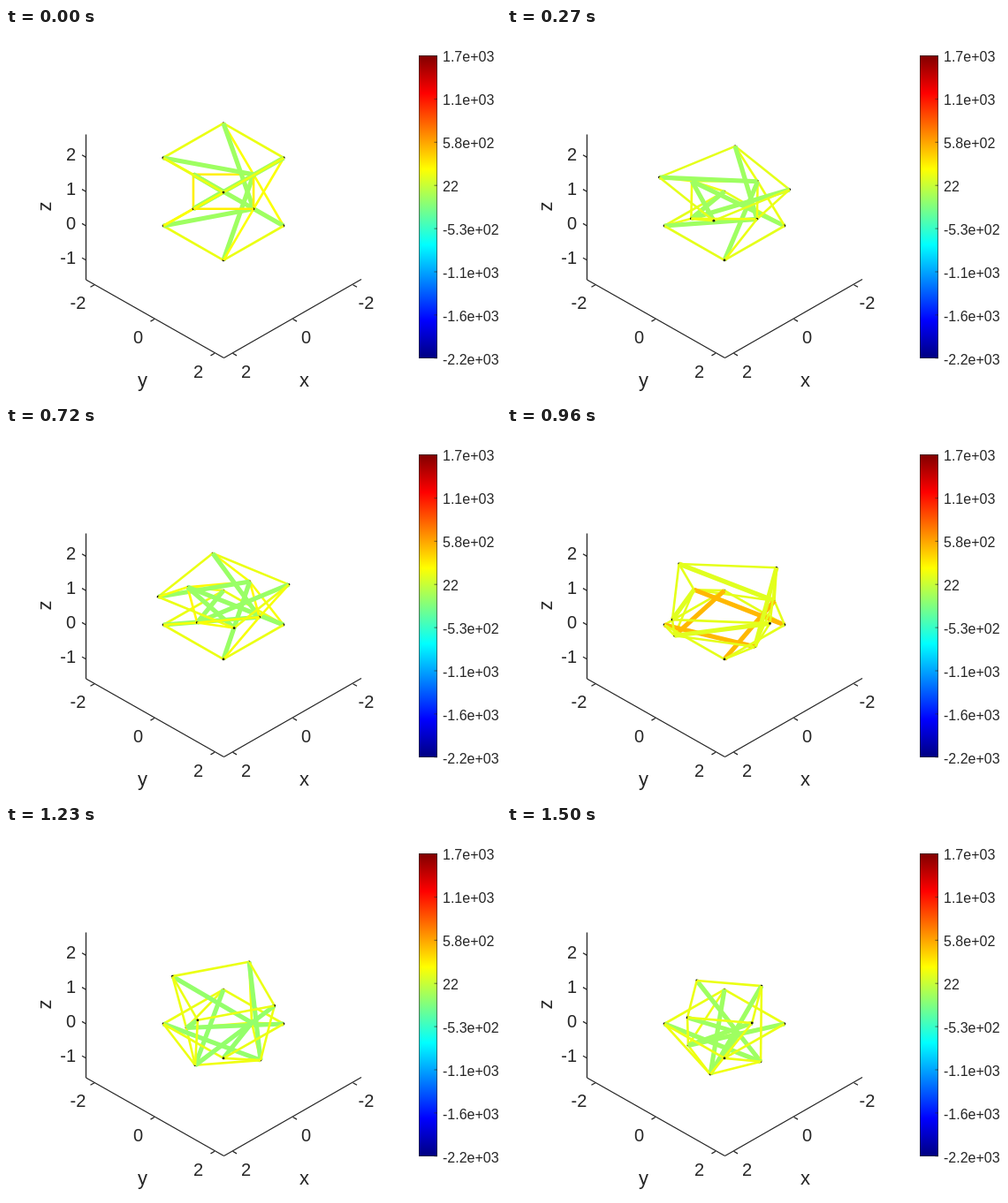
Write an HTML page with a canvas that moves like this. It is 560x420 px and loops after 1530 ms.

```html
<!DOCTYPE html>
<html lang="en">
<head>
<meta charset="utf-8">
<title>Tensegrity tower</title>
<style>
html, body { margin: 0; width: 100%; height: 100%; overflow: hidden; background: #fff; }
canvas { display: block; width: 560px; height: 420px; }
</style>
</head>
<body>
<canvas id="stage" width="560" height="420"></canvas>
<script>
const ctx = document.getElementById('stage').getContext('2d');
const LOOP = 1530, STEP = 30;
const CX = 246, BASE_Y = 224, BASE_R = 68;
const TILT = 0.572, RISE = 0.807;
const INK = '#262626', FONT = '"Liberation Sans", Arial, sans-serif';

// time, top turn, mid turn, top y, mid y, lower bar length, upper bar length,
// then colour levels: lower bars, upper bars, cables, middle ring
const KEYS = [
  [0, 0, 0, 147, 185.3, 117.8, 117.8, .53, .53, .605, .64],
  [270, 9.3, .6, 176, 194.8, 117.1, 116.4, .53, .53, .6, .61],
  [480, -13.2, -8.6, 183.5, 200.5, 116.9, 117, .525, .525, .605, .64],
  [720, -9.3, -8.8, 185.3, 198.2, 117.1, 117.4, .525, .525, .605, .63],
  [960, 48.9, 13.6, 188.7, 216.5, 117.4, 115.9, .695, .595, .6, .6],
  [1080, 46, 17, 187.5, 235.5, 117.8, 116.5, .6, .57, .6, .6],
  [1230, 26.8, -7.7, 186.8, 246.8, 118, 117.2, .52, .52, .605, .61],
  [1500, -36.7, -23.7, 199, 257.6, 117.8, 117.7, .53, .53, .605, .61]
];

const slope = (i, c) => {
  const a = KEYS[Math.max(i - 1, 0)], b = KEYS[Math.min(i + 1, KEYS.length - 1)];
  return (b[c] - a[c]) / (b[0] - a[0]);
};

// Cubic motion for the pose, linear for the colour levels
function sample(time) {
  let i = 0;
  while (i < KEYS.length - 2 && time >= KEYS[i + 1][0]) i++;
  const a = KEYS[i], b = KEYS[i + 1], span = b[0] - a[0], u = (time - a[0]) / span;
  return a.map((p, c) => {
    const d = b[c] - p;
    if (c > 4) return p + d * u;
    const m = slope(i, c) * span, n = slope(i + 1, c) * span;
    return p + m * u + (3 * d - 2 * m - n) * u * u + (m + n - 2 * d) * u * u * u;
  });
}

const rad = deg => deg * Math.PI / 180;

// Outer radius that keeps a rigid bar of the given length
function reach(r, deg, dy, len) {
  const c = r * Math.cos(rad(deg)), z = dy / RISE;
  return c + Math.sqrt(Math.max(0, c * c - r * r - z * z + len * len));
}

function ring(r, start, y) {
  return [0, 1, 2, 3].map(k => {
    const a = rad(start + 90 * k), v = r * Math.sin(a);
    return { x: CX + r * Math.cos(a), y: y + TILT * v,
             depth: v * RISE + (BASE_Y - y) / RISE * TILT };
  });
}

function jet(v) {
  const ch = mid => Math.round(255 * Math.min(1, Math.max(0, 1.5 - Math.abs(4 * v - mid))));
  return `rgb(${ch(3)},${ch(2)},${ch(1)})`;
}

function line(x1, y1, x2, y2, color = INK, width = 1.3) {
  ctx.strokeStyle = color;
  ctx.lineWidth = width;
  ctx.beginPath();
  ctx.moveTo(x1, y1);
  ctx.lineTo(x2, y2);
  ctx.stroke();
}

function label(text, x, y, size = 20, align = 'center') {
  ctx.fillStyle = INK;
  ctx.font = `${size}px ${FONT}`;
  ctx.textAlign = align;
  ctx.textBaseline = 'alphabetic';
  ctx.fillText(text, x, y + size * 0.36);
}

function drawAxes() {
  line(90.5, 120.5, 90.5, 285);
  line(90.5, 285, 246.5, 373.5);
  line(246.5, 373.5, 402, 284.5);
  for (const z of [-1, 0, 1, 2]) {
    const y = BASE_Y - 38.8 * z;
    line(90.5, y, 86, y - 2.6);
    label(z, 79, y - 3.5, 20, 'right');
  }
  for (const n of [-2, 0, 2]) {
    const yx = 168 + 34 * n, xx = 324.5 - 34 * n, y = 329.5 + 19.4 * n;
    line(yx, y, yx - 4.5, y + 2.6);
    line(xx, y, xx + 4.5, y + 2.6);
    label(n, yx - 18.5, y + 20);
    label(n, xx + 15, y + 20);
  }
  label('x', 337.5, 398, 22);
  label('y', 154.5, 398, 22);
  ctx.save();
  ctx.translate(43, 202);
  ctx.rotate(-Math.PI / 2);
  label('z', 0, 0, 22);
  ctx.restore();
}

function drawColorbar() {
  const fill = ctx.createLinearGradient(0, 374, 0, 31);
  for (const v of [0, .125, .375, .625, .875, 1]) fill.addColorStop(v, jet(v));
  ctx.fillStyle = fill;
  ctx.fillRect(467, 31, 21, 343);
  ctx.strokeStyle = INK;
  ctx.lineWidth = 0.6;
  ctx.strokeRect(467.5, 31.5, 20, 342);
  ['1.7e+03', '1.1e+03', '5.8e+02', '22', '-5.3e+02', '-1.1e+03', '-1.6e+03', '-2.2e+03']
    .forEach((text, i) => {
      const y = 31.5 + i * 48.9;
      line(484.5, y, 488, y, INK, 0.7);
      label(text, 494, y + 1, 16, 'left');
    });
}

function drawTower(time) {
  const [, turnT, turnM, yT, yM, lenL, lenU, cL, cU, cCable, cRing] = sample(time);
  const rM = reach(BASE_R, 135 - turnM, BASE_Y - yM, lenL);
  const rT = reach(rM, 135 + turnM - turnT, yM - yT, lenU);
  const base = ring(BASE_R, 180, BASE_Y);
  const mid = ring(rM, 225 + turnM, yM);
  const top = ring(rT, 180 + turnT, yT);

  const parts = [];
  const add = (a, b, level, width) =>
    parts.push({ a, b, level, width, depth: (a.depth + b.depth) / 2 });
  for (let k = 0; k < 4; k++) {
    const next = (k + 1) % 4, prev = (k + 3) % 4;
    add(base[k], mid[(k + 2) % 4], cL, 5.2);
    add(top[k], mid[next], cU, 5.2);
    add(base[k], base[next], cCable, 2.6);
    add(top[k], top[next], cCable, 2.6);
    add(mid[k], mid[next], cRing, 2.6);
    add(base[k], mid[prev], (cCable + cRing) / 2, 2.6);
    add(top[k], mid[k], (cCable + cRing) / 2, 2.6);
  }
  for (const dot of [...base, ...mid, ...top]) parts.push({ dot, depth: dot.depth });

  parts.sort((p, q) => p.depth - q.depth);
  for (const { a, b, dot, level, width } of parts) {
    if (dot) {
      ctx.fillStyle = '#111';
      ctx.beginPath();
      ctx.arc(dot.x, dot.y, 1.4, 0, 2 * Math.PI);
      ctx.fill();
    } else {
      line(a.x, a.y, b.x, b.y, jet(level), width);
    }
  }
}

const start = performance.now();
function frame() {
  const t = Math.max(0, performance.now() - start) % LOOP;
  ctx.fillStyle = '#fff';
  ctx.fillRect(0, 0, 560, 420);
  drawAxes();
  drawColorbar();
  drawTower(Math.floor(t / STEP) * STEP);
  requestAnimationFrame(frame);
}
frame();
</script>
</body>
</html>
```
